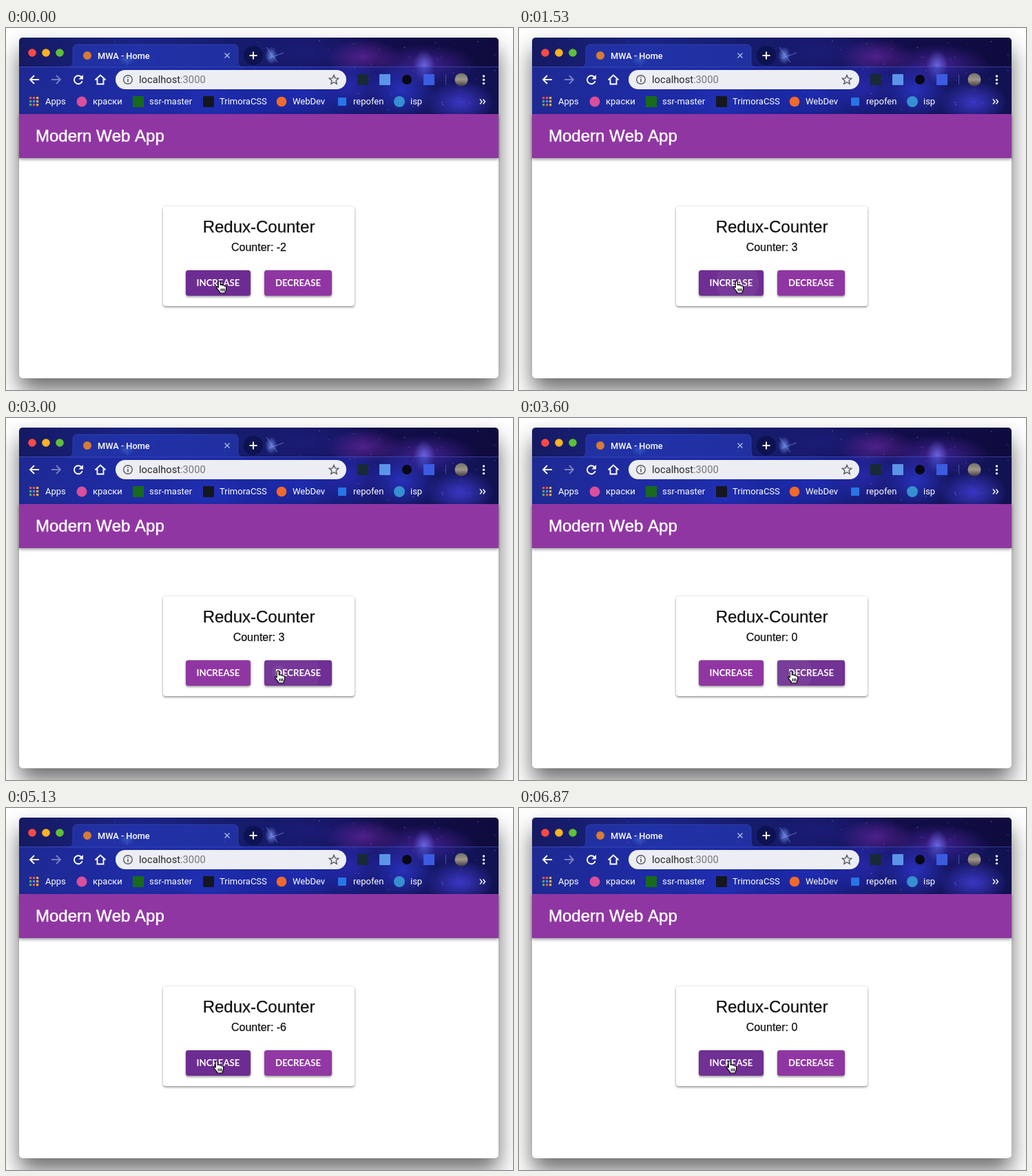
An HTML page that plays this animation: 736x526 px, repeating every 6940 ms.

```html
<!DOCTYPE html>
<html lang="en">
<head>
<meta charset="utf-8">
<title>Redux-Counter</title>
<style>
  html, body { margin: 0; width: 100%; height: 100%; overflow: hidden; background: #fff; }
  .window, .sky, svg { position: absolute; }
  .window { left: 19px; top: 14px; width: 696px; height: 495px; border-radius: 5px; background: #fff;
    box-shadow: 0 0 1px rgba(0,0,0,.4), 0 18px 32px rgba(0,0,0,.58); }
  .sky { left: 19px; top: 14px; width: 696px; height: 111px; border-radius: 5px 5px 0 0;
    background:
      radial-gradient(ellipse 9px 13px at 366px 26px, rgba(125,165,255,.75), transparent),
      radial-gradient(ellipse 12px 9px at 156px 32px, rgba(110,190,240,.75), transparent),
      radial-gradient(ellipse 16px 24px at 588px 42px, rgba(120,125,255,.75), transparent),
      radial-gradient(ellipse 55px 26px at 500px 28px, rgba(110,40,165,.65), transparent),
      radial-gradient(ellipse 75px 30px at 590px 40px, rgba(85,40,175,.7), transparent),
      radial-gradient(ellipse 50px 40px at 556px 76px, rgba(60,70,255,.75), transparent),
      radial-gradient(ellipse 50px 32px at 640px 94px, rgba(85,75,255,.85), transparent),
      radial-gradient(ellipse 45px 36px at 480px 70px, rgba(70,50,220,.6), transparent),
      radial-gradient(ellipse 70px 30px at 410px 82px, rgba(40,55,215,.6), transparent),
      radial-gradient(ellipse 60px 50px at 275px 95px, rgba(50,65,220,.45), transparent),
      radial-gradient(ellipse 110px 45px at 420px 20px, rgba(30,30,130,.7), transparent),
      linear-gradient(90deg, #151a62, #1a2384 25%, #141963 52%, #130e4c 74%, #0e0b3d); }
  svg { left: 0; top: 0; }
  text { font-family: Roboto, sans-serif; }
  .app text { font-family: "Liberation Sans", Arial, sans-serif; font-kerning: none; fill: #111; stroke: #111; stroke-width: .25; }
  .app .title { fill: #fff; stroke: #fff; stroke-width: .5; }
  .app .label { font: 700 13.2px Lato, sans-serif; fill: #fff; stroke: none; }
  .card { filter: drop-shadow(0 2px 1.5px rgba(0,0,0,.32)) drop-shadow(0 0 1.5px rgba(0,0,0,.16)); }
  .line { fill: none; stroke: #fff; stroke-width: 1.9; }
</style>
</head>
<body>
<div class="window"></div>
<div class="sky"></div>
<svg width="736" height="526" viewBox="0 0 736 526">
  <defs>
    <linearGradient id="bar">
      <stop stop-color="#2230a8" stop-opacity=".7"/>
      <stop offset=".5" stop-color="#1e2fc4" stop-opacity=".62"/>
      <stop offset="1" stop-color="#18207c" stop-opacity=".3"/>
    </linearGradient>
    <linearGradient id="photo" x2="0" y2="1">
      <stop stop-color="#6b7562"/><stop offset=".5" stop-color="#a0948c"/><stop offset="1" stop-color="#413d3b"/>
    </linearGradient>
    <clipPath id="clip0"><rect x="261" y="352" width="94" height="37" rx="3.5"/></clipPath>
    <clipPath id="clip1"><rect x="375" y="352" width="98" height="37" rx="3.5"/></clipPath>
  </defs>

  <g id="stars" fill="#b9c4ff"></g>
  <g stroke="#8aa5ff" stroke-opacity=".6"><path d="M378 28l16 22M381 44l22-8M169 46h14M176 38v17"/></g>
  <rect x="19" y="56" width="696" height="69" fill="url(#bar)"/>
  <path d="M19 56.5H91M343 56.5H715" stroke="#5363c8" stroke-opacity=".55"/>
  <path d="M90 57Q97 57 97 49V31Q97 24 104 24H330Q337 24 337 31V49Q337 57 344 57Z" fill="#2538b4" fill-opacity=".72" stroke="#4d61cd" stroke-opacity=".4"/>
  <circle cx="38" cy="36" r="5.800" fill="#fb4a46"/>
  <circle cx="58" cy="36" r="5.800" fill="#fdb225"/>
  <circle cx="78" cy="36" r="5.800" fill="#5fc038"/>
  <circle cx="118" cy="40" r="6" fill="#d77b35"/>
  <text x="133" y="44.500" font-size="12.8" font-weight="500" fill="#fff">MWA - Home</text>
  <path d="M317.500 36.500l7 7m0-7l-7 7" stroke="#b5bdeb" stroke-width="1.3"/>
  <circle cx="359" cy="40" r="14" fill="#0b104a" fill-opacity=".8"/>
  <path class="line" d="M353.500 40h11M359 34.500v11"/>

  <path class="line" d="M48 75H35.500M41 69l-6 6 6 6"/>
  <path class="line" opacity=".4" d="M66 75h12.500M73 69l6 6-6 6"/>
  <path class="line" d="M110 72a6 6 0 1 0 .7 5"/>
  <path d="M112 68v6.500h-6.500z" fill="#fff"/>
  <path class="line" d="M129.500 75.500L137 68.500l7.500 7M132.500 74v7.500h9V74"/>
  <rect x="159" y="61" width="335" height="28" rx="14" fill="#eceef3"/>
  <circle cx="177" cy="75" r="6.300" fill="none" stroke="#555a60" stroke-width="1.4"/>
  <path d="M177 74v4.500M177 71v1.600" stroke="#555a60" stroke-width="1.6"/>
  <text x="193" y="80" font-size="14.7" fill="#25282c">localhost<tspan fill="#73777d">:3000</tspan></text>
  <path d="M476 68.500l1.900 4.400 4.800.4-3.600 3.200 1.100 4.700-4.200-2.500-4.200 2.500 1.100-4.700-3.600-3.200 4.800-.4z" fill="none" stroke="#555a60" stroke-width="1.4"/>
  <rect x="510" y="67" width="16" height="16" fill="#182a35"/>
  <rect x="542" y="67" width="16" height="16" rx="1" fill="#5c94e8"/>
  <circle cx="582" cy="75" r="7" fill="#080914"/>
  <rect x="606" y="67" width="16" height="16" fill="#3b5be0"/>
  <path d="M638.500 68v14" stroke="#6473cf" stroke-opacity=".6"/>
  <circle cx="661" cy="75" r="9.500" fill="url(#photo)"/>
  <g fill="#fff"><circle cx="693.500" cy="70" r="1.700"/><circle cx="693.500" cy="75.300" r="1.700"/><circle cx="693.500" cy="80.600" r="1.700"/></g>

  <g id="grid"></g>
  <circle cx="110" cy="107" r="7.500" fill="#d94f9b"/>
  <rect x="184" y="99" width="16" height="16" fill="#176b1b"/>
  <rect x="286" y="99" width="16" height="16" rx="1" fill="#15171f"/>
  <circle cx="400" cy="107" r="7.300" fill="#f0692d"/>
  <rect x="482" y="101" width="12" height="12" rx="1" fill="#2775e6"/>
  <circle cx="571" cy="107" r="8" fill="#368fd0"/>
  <g id="marks" font-size="13" fill="#fff"></g>
  <path d="M688 103.500l3 3.500-3 3.500M692.500 103.500l3 3.500-3 3.500" class="line" style="stroke-width:1.4"/>

  <g class="app">
    <rect x="19" y="125" width="696" height="64" fill="#9036a3" style="filter:drop-shadow(0 2px 2px rgba(0,0,0,.4))"/>
    <text class="title" x="43" y="165" font-size="24">Modern Web App</text>
    <rect class="card" x="228" y="259" width="278" height="145" rx="4" fill="#fff"/>
    <text x="367" y="297" font-size="24" text-anchor="middle">Redux-Counter</text>
    <text id="count" x="367" y="324" font-size="16" text-anchor="middle"></text>
    <rect class="card" id="b0" x="261" y="352" width="94" height="37" rx="3.5"/>
    <rect class="card" id="b1" x="375" y="352" width="98" height="37" rx="3.5"/>
    <g id="r0" clip-path="url(#clip0)" fill="#fff"></g>
    <g id="r1" clip-path="url(#clip1)" fill="#fff"></g>
    <text class="label" x="308" y="375" text-anchor="middle">INCREASE</text>
    <text class="label" x="424" y="375" text-anchor="middle">DECREASE</text>
  </g>

  <g id="cursor" stroke-linejoin="round">
    <path id="hand" fill="#fff" stroke="#000" stroke-width="1.2" d="M-1.800 1.500Q-1.800 0 -.3 0T1.300 1.500V6Q3.600 4.500 4.300 6.500 6.300 5.500 7 7.500 9.600 6.700 9.600 9.500V12Q9.400 14 8.200 15.500V17.500H.3V16Q-2 13.500 -4.300 10.200 -5 8.400 -3.300 8.300L-1.800 9.700Z M2.300 11v4M4.600 11v4M6.800 11v4"/>
    <path id="arrow" fill="#000" stroke="#fff" d="M0 0V15L3.500 12 6 17.500 8.400 16.500 6 11H10.500Z"/>
  </g>
</svg>
<script>
  const LOOP = 6940;
  const $ = id => document.getElementById(id);
  const clamp = v => Math.max(0, Math.min(1, v));
  const smooth = v => (v = clamp(v), v * v * (3 - 2 * v));

  // click times: up, down, up again
  const clicks = [
    [1, [250, 520, 790, 1070, 1360, 1640, 1910, 2165]],
    [-1, [2560, 2735, 2910, 3085, 3260, 3435, 3635, 3835, 4035, 4235, 4435, 4635]],
    [1, [5140, 5410, 5680, 5950, 6200, 6450]]
  ].flatMap(([step, times]) => times.map(at => ({ step, at })));

  // pointer tip: time, x
  const path = [[0, 311], [800, 311], [1360, 317], [1640, 317], [2165, 326], [2350, 326],
    [2550, 396], [4700, 396], [5060, 307], [LOOP, 307]];

  function pointerX(t) {
    const i = path.findIndex(p => p[0] > t);
    const [t0, x0] = path[i - 1], [t1, x1] = path[i];
    return x0 + (x1 - x0) * smooth((t - t0) / (t1 - t0));
  }

  function mix(k) {
    const a = [144, 54, 163], b = [109, 44, 146];
    return `rgb(${a.map((v, i) => v + (b[i] - v) * k)})`;
  }

  function ripples(step, t) {
    return clicks.filter(c => c.step === step && t >= c.at && t < c.at + 550).map(c => {
      const age = t - c.at;
      const alpha = .055 * (1 - clamp((age - 150) / 400));
      return `<circle cx="${pointerX(c.at)}" cy="370" r="${80 * smooth(age / 400)}" opacity="${alpha}"/>`;
    }).join('');
  }

  function draw(now) {
    const t = now % LOOP, x = pointerX(t);
    const value = clicks.reduce((n, c) => t >= c.at ? n + c.step : n, -2);
    const fade = at => clamp((t - at) / 200);
    $('count').textContent = 'Counter: ' + value;
    $('b0').setAttribute('fill', mix(1 - fade(2440) + fade(4885)));
    $('b1').setAttribute('fill', mix(fade(2480) - fade(4825)));
    $('r0').innerHTML = ripples(1, t);
    $('r1').innerHTML = ripples(-1, t);
    $('cursor').setAttribute('transform', `translate(${x - 1} 367.5)`);
    const between = x > 355 && x < 375;
    $('hand').style.display = between ? 'none' : '';
    $('arrow').style.display = between ? '' : 'none';
    requestAnimationFrame(draw);
  }

  let seed = 7;
  const random = () => (seed = seed * 16807 % 2147483647) / 2147483647;
  for (let i = 0; i < 110; i++)
    $('stars').innerHTML += `<circle cx="${20 + random() * 694}" cy="${17 + random() * 106}" r="${.3 + random() * .6}" opacity="${.15 + random() * .5}"/>`;

  const dots = ['#ef5548', '#ef5548', '#f3b62f', '#4eaf59', '#4b8df5', '#f3b62f', '#4eaf59', '#ef5548', '#f3b62f'];
  $('grid').innerHTML = dots.map((c, i) =>
    `<rect x="${34 + i % 3 * 5}" y="${100 + (i / 3 | 0) * 5}" width="3.2" height="3.2" fill="${c}"/>`).join('');

  $('marks').innerHTML = [[57, 'Apps'], [126, 'краски'], [208, 'ssr-master'], [310, 'TrimoraCSS'],
    [416, 'WebDev'], [504, 'repofen'], [587, 'isp']]
    .map(([x, s]) => `<text x="${x}" y="111">${s}</text>`).join('');

  requestAnimationFrame(draw);
</script>
</body>
</html>
```
